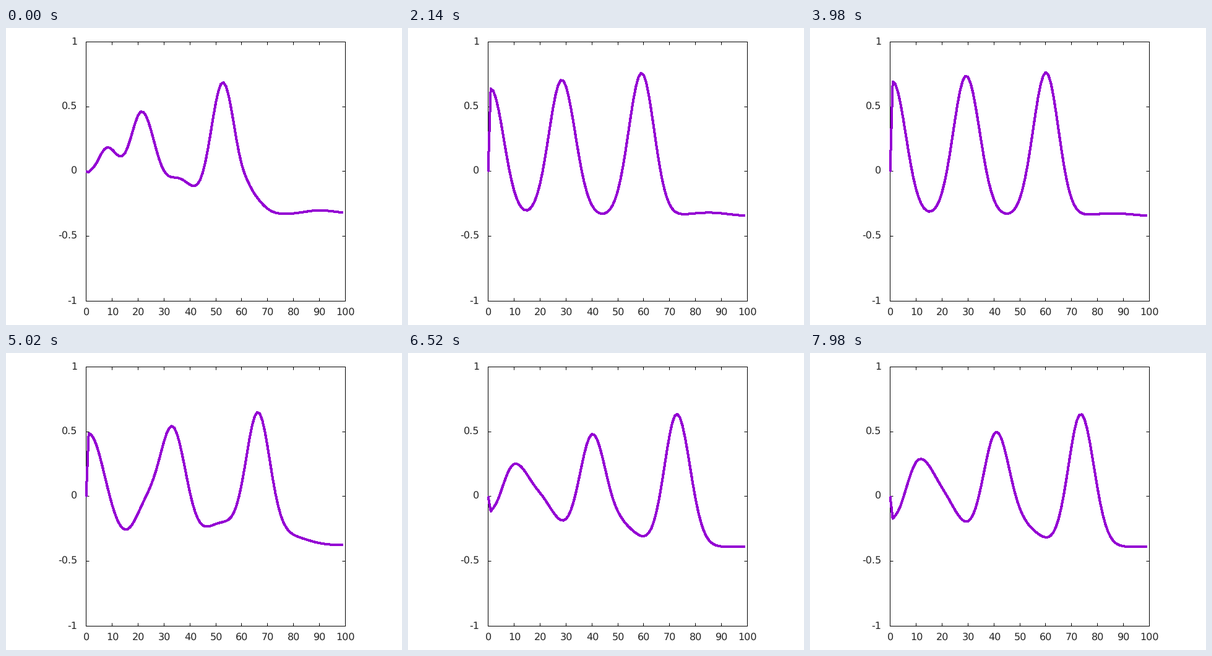
Animation of 640 by 480 pixels, one loop 8 s. Source, as a matplotlib script:

```python
import numpy as np
import matplotlib.pyplot as plt
from matplotlib.animation import FuncAnimation

W, H, DPI = 640, 480, 100
LEFT, RIGHT, TOP, BOTTOM = 129.5, 548.5, 22.5, 441.5
FRAMES, INTERVAL = 400, 20
STAGE = 100                 # frames between two jumps of the wave
PX = 72 / DPI               # one pixel in points
DRIFT = .5                  # speed of the wave to the right, units per second

# Stage: reference time (s), floor level, stretch rate near the left end,
# and bumps as (centre, height, left width, right width).
STAGES = [
    (0, -.33, -.115, [
        (0, .15, 2, 2.2), (8, .505, 5, 5.1), (21.6, .773, 4.6, 5.1),
        (36, .262, 5.3, 5.7), (52.8, 1.015, 4.65, 4.7),
        (63.2, .132, 2.9, 4.5), (90, .03, 6, 7)]),
    (.14, -.347, 0, [
        (1, .987, 5, 5.04), (28.4, 1.055, 4.95, 5.2),
        (59.2, 1.107, 4.95, 4.8), (85, .03, 8, 8)]),
    (1.02, -.375, 0, [
        (1, .863, 6, 6.3), (22.5, .24, 4.1, 4.1), (33.2, .909, 5.2, 5.2),
        (52, .165, 6, 6), (66.3, 1.015, 4.64, 4.67), (78, .07, 4.5, 7)]),
    (.52, -.388, .077, [
        (0, .1, 2, 2), (10.4, .638, 6, 7.3), (23, .186, 4.4, 5.75),
        (40.3, .866, 5.05, 5.3), (52.5, .133, 4.35, 5.6),
        (72.8, 1.025, 4.75, 5.05)]),
]


def bump(x, centre, height, left, right):
    width = np.where(x < centre, left, right)
    return height * np.exp(-((x - centre) / width)**2 / 2)


def wave(frame):
    start, floor, stretch, bumps = STAGES[frame // STAGE]
    t = frame % STAGE * INTERVAL / 1000 - start
    x = np.arange(100)
    y = np.full(100, floor)
    for centre, height, left, right in bumps:
        speed = stretch * centre if centre < 15 else DRIFT
        # crests grow near the left end, the low bumps between them fade
        growth = .03 * max(0, 1 - centre / 65) if height > .3 else -.1 * height
        y += bump(x, centre + speed * t, height + growth * t, left, right)
    y[0] = 0                # the left end is held
    return y


def to_px(x):
    return LEFT + (RIGHT - LEFT) * x / 100


def to_py(y):
    return TOP + (BOTTOM - TOP) * (1 - y) / 2


plt.rcParams["text.hinting"] = "none"
fig = plt.figure(figsize=(W / DPI, H / DPI), dpi=DPI, facecolor="white")
ax = fig.add_axes([0, 0, 1, 1])
ax.set(xlim=(0, W), ylim=(H, 0))
ax.axis("off")
font = dict(family="DejaVu Sans", size=16 * PX, color="#262626",
            va="baseline")


def rule(xs, ys):
    ax.plot(xs, ys, color="black", lw=PX, solid_capstyle="butt",
            solid_joinstyle="miter", snap=False, zorder=3)


for v in range(0, 101, 10):
    px = np.floor(to_px(v)) + .5
    rule([px, px], [BOTTOM, BOTTOM - 5])
    rule([px, px], [TOP, TOP + 5])
    ax.text(px + .5, 465, str(v), ha="center", **font)
for v in (-1, -.5, 0, .5, 1):
    py = np.floor(to_py(v) - .1) + .5
    rule([LEFT, LEFT + 5], [py, py])
    rule([RIGHT, RIGHT - 5], [py, py])
    ax.text(115.5, py + 4.5, f"{v:g}", ha="right", **font)
rule([LEFT, RIGHT, RIGHT, LEFT, LEFT], [TOP, TOP, BOTTOM, BOTTOM, TOP])

line, = ax.plot([], [], color="#9400d3", lw=3 * PX, antialiased=False,
                solid_capstyle="butt", solid_joinstyle="round", zorder=4)


def update(frame):
    line.set_data(to_px(np.arange(100)), to_py(wave(frame)))
    return line,


anim = FuncAnimation(fig, update, frames=FRAMES, interval=INTERVAL,
                     init_func=lambda: update(0), repeat=True, repeat_delay=0)
plt.show()
```
